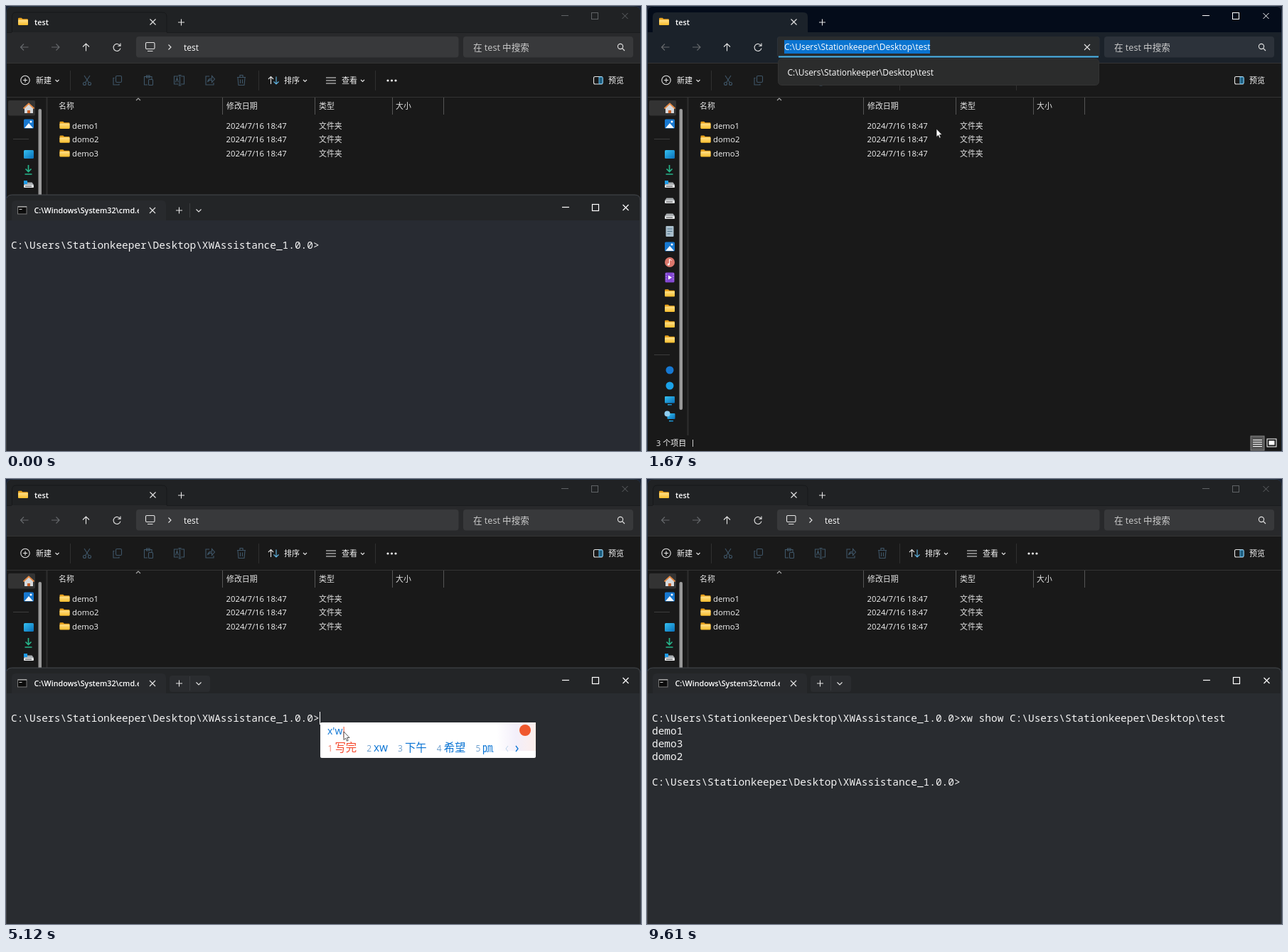
Animation, 893 px wide and 627 px high, one loop 9.76 s. Source, as an HTML page:

```html
<!DOCTYPE html>
<html lang="zh-CN">
<head>
<meta charset="utf-8">
<title>Terminal demo</title>
<style>
html, body { margin: 0; width: 100%; height: 100%; overflow: hidden; background: #1b2436; }
svg { display: block; }
text { font: 11.3px "Open Sans", "Noto Sans CJK SC", "Noto Sans CJK", sans-serif; fill: #f4f4f4; white-space: pre; }
.m { font-weight: 500; font-size: 11px; }
.b { font-weight: 600; font-size: 10.75px; fill: #fff; }
.a { font-size: 12px; fill: #fff; }
.h { font-size: 10.9px; fill: #e4e4e4; }
.line { fill: none; stroke: #e6e6e6; stroke-width: 1.1; }
.dim { fill: none; stroke: #3f5668; stroke-width: 1.1; }
.sep { stroke: #303030; fill: none; }
#lines text { font: 14.467px "Noto Sans Mono", monospace; fill: #f4f4f4; }
#ime text { font-size: 15.4px; fill: #0a74d4; }
#ime .n { font-size: 12px; fill: #6d9fce; }
#ime .first { fill: #f5482c; }
#ime .n.first { fill: #f0806c; }
</style>
</head>
<body>
<svg width="893" height="627" viewBox="0 0 893 627">
<defs>
  <linearGradient id="blue" x2="1" y2="1"><stop stop-color="#35c1f1"/><stop offset="1" stop-color="#0a6fb8"/></linearGradient>
  <linearGradient id="gold" x2="0" y2="1"><stop stop-color="#ffe08a"/><stop offset="1" stop-color="#f9bd2c"/></linearGradient>
  <linearGradient id="blush"><stop stop-color="#fff"/><stop offset=".5" stop-color="#f3effa"/><stop offset="1" stop-color="#fdeeea"/></linearGradient>
  <g id="folder"><path d="M-7-4q0-1.200 1.200-1.200h3.600l1.600 1.500h6.400q1.200 0 1.200 1.200V4H-7Z" fill="#e9a21b"/><rect x="-7" y="-2.500" width="14" height="7.500" rx="1" fill="url(#gold)"/></g>
  <g id="drive"><path d="M-4.500-3.500h9L7 0H-7Z" fill="#a9adb0"/><rect x="-7" y="0" width="14" height="4" rx="1" fill="#e2e4e6"/><path d="M-5 2H4" stroke="#444"/></g>
  <g id="photo"><rect x="-7" y="-6.500" width="14" height="13" rx="1.500" fill="#1778d0"/><path d="M-6 6 0-1 6 6Z" fill="#f4f9ff"/><circle cx="3" cy="-3" r="1.500" fill="#fff"/></g>
  <path id="down" d="M-2.500-1 0 1.500 2.500-1" class="line"/>
  <path id="cross" d="M-4-4 4 4M4-4-4 4"/>
  <path id="plus" d="M-4.500 0h9M0-4.500v9" class="line"/>
  <g id="controls" fill="none"><path d="M-47-.5h10"/><rect x="-4.500" y="-4.500" width="9" height="9"/><use href="#cross" x="42.500"/></g>
</defs>

<g id="explorer">
  <rect x=".5" y=".5" width="892" height="636" rx="8" fill="#191919" stroke="#2c3c50"/>
  <path d="M1 37V8q0-7 7-7H885q7 0 7 7V37Z" fill="#202224"/>
  <path d="M1 37H892V80H1Z" fill="#28292b"/>
  <path d="M8.500 37V15q0-6 6-6H220q6 0 6 6V37" fill="#202224" stroke="#17181a"/>
  <path d="M1 37.500H8M226 37.500H892" stroke="#1a1b1d"/>
  <g id="navy">
    <path d="M1 37V8q0-7 7-7H885q7 0 7 7V37Z" fill="#040c1a"/>
    <path d="M1 37H892V80H1ZM8 37V15q0-6 6-6H220q6 0 6 6V37" fill="#1b222a"/>
  </g>
  <path d="M1 80.500H892M1 128.500H892" stroke="#343434"/>
  <use href="#folder" x="24" y="22"/><text x="40" y="27" class="b">test</text>
  <use href="#cross" x="206.500" y="22.500" class="line"/><use href="#plus" x="246.500" y="23"/>
  <use href="#controls" id="windowButtons" x="828" y="14"/>

  <g class="line">
    <path d="M31.500 58H20.500M25 53.500 20.500 58l4.500 4.500M64 58H75M70.500 53.500 75 58l-4.500 4.500" stroke="#66696c"/>
    <path d="M112.500 63.500V53M108 57.500 112.500 53l4.500 4.500"/>
    <path d="M160.500 56a5 5 0 1 0 .5 3.500M161 52.500v3.800h-3.800"/>
  </g>
  <g fill="#fff" fill-opacity=".075"><rect x="183" y="43" width="453.500" height="29.500" rx="4"/><rect x="643" y="43" width="239" height="29.500" rx="4"/></g>
  <g class="line"><rect x="196.500" y="51.500" width="12.500" height="9" rx="1.500"/><path d="M199 63.500h7.500M228.500 54.500l3.500 3.500-3.500 3.500"/><circle cx="864" cy="57" r="3.600"/><path d="M866.600 59.600 870 63"/></g>
  <text x="250" y="62.500" class="a">test</text>
  <text x="657" y="62.500" style="font-size:12.600px;fill:#ccc">在 test 中搜索</text>

  <g class="line"><circle cx="27" cy="104.500" r="6.200"/><path d="M24 104.500h6M27 101.500v6"/></g>
  <text x="42" y="109" class="m">新建</text><use href="#down" x="72" y="105"/>
  <path d="M90.500 91v28M355.500 91v28M519.500 91v28" class="sep"/>
  <g class="dim">
    <path d="M110 98l6.500 10M118 98l-6.500 10"/><circle cx="110.500" cy="109.500" r="2"/><circle cx="117.500" cy="109.500" r="2"/>
    <rect x="154.500" y="98.500" width="8" height="9" rx="1.500"/><path d="M152.500 101.500h-1.500v9.500h8v-1.500"/>
    <path d="M199 111h-4.500V99.500H205V103M197.500 98h4.500v3h-4.500z"/><rect x="200.500" y="103.500" width="6" height="8" rx="1"/>
    <path d="M243 99h-6.500v11H243M246 99h4.500v11H246M242.500 97.500h4M242.500 112h4M244.500 97.500V112M238.500 107.500l2-6 2 6"/>
    <path d="M286 99h-5v12h11v-3M283.500 107q1-5 6-5v-3.500l4 4.500-4 4.500V104q-4 0-6 3Z"/>
    <path d="M325 100.500h12M329 100v-2.500h4v2.500M326 101l1 10.500h8l1-10.500M329.500 103.500v5.500M332.500 103.500v5.500"/>
  </g>
  <path d="M372.500 110V99.500M369 103l3.500-3.500L376 103" class="line"/><path d="M380 99.500V110M376.500 106.500 380 110l3.500-3.500" class="line" style="stroke:#62b9e8"/>
  <text x="391" y="109" class="m">排序</text><use href="#down" x="420.500" y="105"/>
  <path d="M450 101h14M450 105h14M450 109h14" class="line"/><text x="472" y="109" class="m">查看</text><use href="#down" x="501.500" y="105"/>
  <g fill="#eee"><circle cx="537" cy="105" r="1.600"/><circle cx="542.500" cy="105" r="1.600"/><circle cx="548" cy="105" r="1.600"/></g>
  <rect x="826.500" y="99.500" width="12.500" height="10.500" rx="2" class="line"/><path d="M834 100h3.500q1.500 0 1.500 1.500v6.500q0 1.500-1.500 1.500H834Z" fill="#1f5f80" stroke="#62b9e8"/>
  <text x="847" y="109" class="m">预览</text>

  <path d="M304.500 129v24M434.500 129v24M543.500 129v24M615.500 129v24" stroke="#555"/>
  <path d="M183 133l3-3 3 3" class="line" stroke-opacity=".7"/>
  <text x="74" y="145" class="h">名称</text><text x="310" y="145" class="h">修改日期</text><text x="440" y="145" class="h">类型</text><text x="548" y="145" class="h">大小</text>
  <g id="rows"></g>

  <rect x="3" y="133" width="38" height="21.500" rx="2" fill="#333"/>
  <path d="M26 143v8h4v-4h4v4h4v-8l-6-5z" fill="#d6d9dc"/><path d="M30 147h4v4h-4z" fill="#c9622a"/><path d="M24.500 144.500 32 137.500l7.500 7" fill="none" stroke="#e58a45" stroke-width="1.800"/>
  <use href="#photo" x="32" y="166"/><use href="#photo" x="32" y="339"/>
  <path d="M10 187.500H32M10 491.500H32" stroke="#3c3c3c"/>
  <rect x="25" y="203" width="14" height="12" rx="1.500" fill="url(#blue)"/>
  <path d="M31.500 224v9M27.500 229.500l4 4 4-4M26.500 237h10" fill="none" stroke="#27b58a" stroke-width="1.700"/>
  <use href="#drive" x="32" y="252"/><rect x="25" y="246" width="5" height="5" fill="#1e9be8"/>
  <use href="#drive" x="32" y="274"/><use href="#drive" x="32" y="296"/>
  <rect x="26.500" y="310" width="11" height="15" rx="1" fill="#a9bfcd"/><path d="M28.500 314h7M28.500 317.500h7M28.500 321h4" stroke="#4f7389"/>
  <circle cx="32" cy="361" r="7" fill="#db776c"/><path d="M31.500 364v-7l3 1.500" stroke="#fff" fill="none"/><circle cx="30.300" cy="364" r="1.500" fill="#fff"/>
  <rect x="25.500" y="375.500" width="13" height="14" rx="1.500" fill="#8246d2"/><path d="M30 379.500v6l5-3z" fill="#fff"/><path d="M27 377v11M37 377v11" stroke="#cba9f5" stroke-dasharray="1.500 2"/>
  <use href="#folder" x="32" y="404.500"/><use href="#folder" x="32" y="426"/><use href="#folder" x="32" y="448"/><use href="#folder" x="32" y="469.500"/>
  <circle cx="32" cy="513" r="5.500" fill="#1678d2"/><circle cx="32" cy="535" r="5.500" fill="#1ba2e8"/>
  <g fill="url(#blue)"><rect x="25" y="550" width="14" height="9.500" rx="1"/><path d="M29 561h6v1.500h-6z"/><rect x="28.500" y="574" width="11" height="8" rx="1"/><path d="M31 584h6v1.500h-6z"/></g><circle cx="28.500" cy="574.500" r="4" fill="#8fcdf0"/>
  <rect x="45.500" y="145" width="4.500" height="424" rx="2" fill="#999"/>
  <path d="M57.500 129V605" stroke="#2e2e2e" stroke-width="2"/>
  <text x="13" y="620" style="font-size:11px">3 个项目</text><path d="M64.500 611v10" stroke="#ccc"/>
  <rect x="849" y="606" width="19" height="20" fill="#555" stroke="#888"/><path d="M852 611.500h13M852 614.500h13M852 617.500h13M852 620.500h13" stroke="#fff"/>
  <rect x="872" y="610" width="13" height="11" fill="#191919" stroke="#fff"/><rect x="874.500" y="612.500" width="8" height="6" fill="#fff"/>

  <g id="address">
    <rect x="184" y="43" width="452" height="29" rx="4" fill="#292c2e"/><path d="M185 71.500H635" stroke="#4cb8ee" stroke-width="2"/>
    <rect x="193" y="48" width="205" height="19" fill="#0b74d0"/><text x="193" y="62" class="a path"></text>
    <use href="#cross" x="619" y="58" class="line"/>
    <g id="popup"><rect x="184.500" y="74.500" width="451" height="37" rx="5" fill="#2b2c2c" stroke="#333"/><text x="197.500" y="97.500" class="a path"></text></g>
  </g>
</g>

<g id="terminal">
  <path d="M.5 630V274q0-8 8-8H884q8 0 8 8V630Z" fill="#292c30" stroke="#424549"/>
  <path id="cool" d="M1 630V274q0-7 7-7H884q7 0 7 7V630Z" fill="#282b32"/>
  <g id="strip">
    <path d="M1 302V274q0-7 7-7H884q7 0 7 7V302Z" fill="#232527"/>
    <path d="M8 302V280q0-6 6-6H219q6 0 6 6V302Z" fill="#282a2d"/>
    <rect id="buttons" x="230" y="277" width="57" height="23" rx="4" fill="#2a2c2f"/>
  </g>
  <rect x="16.500" y="282.500" width="12.500" height="10.500" fill="#0c0c0c" stroke="#777"/><path d="M17 283h12" stroke="#ccc"/><path d="M18.500 286.500h4" stroke="#ccc"/>
  <svg x="39" y="278" width="148" height="20"><text x=".5" y="14" class="b">C:\Windows\System32\cmd.exe</text></svg>
  <use href="#cross" x="206" y="288" class="line"/><use href="#plus" x="243.500" y="288"/><path d="M258.500 278v20" stroke="#3a3c3f"/>
  <path d="M267.500 286.500l3.500 3.500 3.500-3.500" class="line"/>
  <use href="#controls" x="829" y="284" stroke="#fff" stroke-width="1.200"/>
  <g id="lines"></g>
  <rect id="caret" width="1" height="18" fill="#fff"/>
</g>
<g id="ime"></g>
<path id="mouse" d="M0 0V11.500L2.600 9.200 4.400 13.200 6.200 12.400 4.500 8.500H8Z" fill="#fff" stroke="#111" stroke-width=".7"/>
</svg>
<script>
const LOOP = 9760, CHAR = 8.68;
const $ = id => document.getElementById(id);
const home = 'C:\\Users\\Stationkeeper\\Desktop\\';
const folder = home + 'test', prompt = home + 'XWAssistance_1.0.0>';

const typed = [[0, ''], [5260, 'xw'], [5410, 'xw '], [6260, 'xw show'], [6500, 'xw show '], [7210, 'xw show ' + folder]];
const output = [[7920, 'demo1'], [7930, 'demo3'], [7940, 'domo2'], [7960, ''], [7960, prompt]];
const blinks = [[0, 0], [3080, 1], [3660, 0], [4250, 1], [8440, 0], [9000, 1], [9540, 0]];
// time, x, width, input, candidates
const imeStates = [
  [0],
  [4810, 442, 246, 'x', '想 下 小 像 写'],
  [5120, 442, 303, "x'w", '写完 xw 下午 希望 ㏘'],
  [5260],
  [5800, 468, 279, 'sh', '是 上 说 上海 时候'],
  [5870, 468, 279, 'sho', '手 受 收 首先 手机'],
  [6040, 468, 372, 'show', 'show 手腕 收完 受委托 首位玩家'],
  [6260]
];
const route = [[210, 330, 635], [1100, 411, 63], [1300, 411, 63], [1670, 407, 173], [1770, 407, 173], [2170, 409, 272],
  [2810, 286, 632], [3080, 286, 632], [3690, 478, 349], [3900, 478, 349], [4040, 475, 356], [8800, 475, 356], [9140, 556, 632]];

const at = (list, t) => list.filter(item => item[0] <= t).pop();
const ramp = (t, a, b) => Math.min(1, Math.max(0, (t - a) / (b - a)));
const ease = p => p * p * (3 - 2 * p);
const show = (id, on) => $(id).style.visibility = on ? 'visible' : 'hidden';

document.querySelectorAll('.path').forEach(el => el.textContent = folder);
$('rows').innerHTML = ['demo1', 'domo2', 'demo3'].map((name, i) => {
  const y = 168 + 19.7 * i;
  return `<use href="#folder" x="82.500" y="${y}"/><text x="93" y="${y + 4.5}">${name}</text>
    <text x="309.500" y="${y + 4.5}">2024/7/16 18:47</text><text x="440" y="${y + 4.5}" class="h">文件夹</text>`;
}).join('');
$('lines').innerHTML = [0, 1, 2, 3, 4, 5].map(i => `<text x="7" y="${342 + 18 * i}"></text>`).join('');
const lineEls = [...$('lines').children];

function imeMarkup([, x, w, input, words]) {
  if (!x) return '';
  const items = words.split(' ').map((word, i) => {
    const first = i ? '' : 'first';
    return `<tspan class="n ${first}" dx="${i ? 14 : 0}">${i + 1}</tspan><tspan class="${first}" dx="3">${word}</tspan>`;
  }).join('');
  return `<g transform="translate(${x} 343)"><rect width="${w}" height="50" rx="2" fill="#fff"/>
    <rect x="${w - 55}" width="55" height="40" fill="url(#blush)"/><circle cx="${w - 15}" cy="11" r="8" fill="#f0582d"/>
    <text x="10" y="17" style="font-size:14px">${input}<tspan class="first" dx="-2">|</tspan></text>
    <text x="10.500" y="40.500">${items}</text>
    <path d="M${w - 39} 33l-3 4 3 4" fill="none" stroke="#b9d3ea"/><path d="M${w - 28} 33l3 4-3 4" fill="none" stroke="#0a74d4" stroke-width="1.300"/></g>`;
}

function drawTerminal(t) {
  const lines = [prompt + at(typed, t)[1], ...output.filter(o => o[0] <= t).map(o => o[1])];
  lineEls.forEach((el, i) => {
    const text = lines[i] || '';
    if (el.textContent !== text) el.textContent = text;
  });
  const waiting = t >= 7790 && t < 7960;
  const row = waiting ? lines.length : lines.length - 1;
  $('caret').setAttribute('x', waiting ? 7 : Math.round(7 + CHAR * lines[row].length));
  $('caret').setAttribute('y', 328 + 18 * row);
}

function drawMouse(t) {
  const i = route.findIndex(p => p[0] > t);
  show('mouse', i > 0 && (t < 5440 || t >= 8830));
  if (i < 1) return;
  const [a, b] = [route[i - 1], route[i]], p = ease(ramp(t, a[0], b[0]));
  $('mouse').setAttribute('transform', `translate(${a[1] + (b[1] - a[1]) * p} ${a[2] + (b[2] - a[2]) * p})`);
}

let shownIme;
function frame(now) {
  const t = now % LOOP, browsing = t >= 210 && t < 3080;
  $('terminal').style.display = browsing ? 'none' : '';
  $('windowButtons').setAttribute('stroke', browsing ? '#fff' : '#606366');
  $('navy').style.opacity = ramp(t, 1200, 1350) - ramp(t, 3100, 3350);
  $('address').style.display = t >= 1260 && t < 2140 ? '' : 'none';
  $('popup').style.display = t >= 1350 ? '' : 'none';
  show('cool', t < 210);
  show('buttons', t >= 3080);
  $('strip').style.opacity = t < 210 ? 1 : ramp(t, 3100, 3350);
  $('caret').style.opacity = at(blinks, t)[1];
  drawTerminal(t);
  const ime = at(imeStates, t);
  if (ime !== shownIme) $('ime').innerHTML = imeMarkup(shownIme = ime);
  drawMouse(t);
}

const start = performance.now();
(function tick() {
  frame(performance.now() - start);
  requestAnimationFrame(tick);
})();
</script>
</body>
</html>
```
